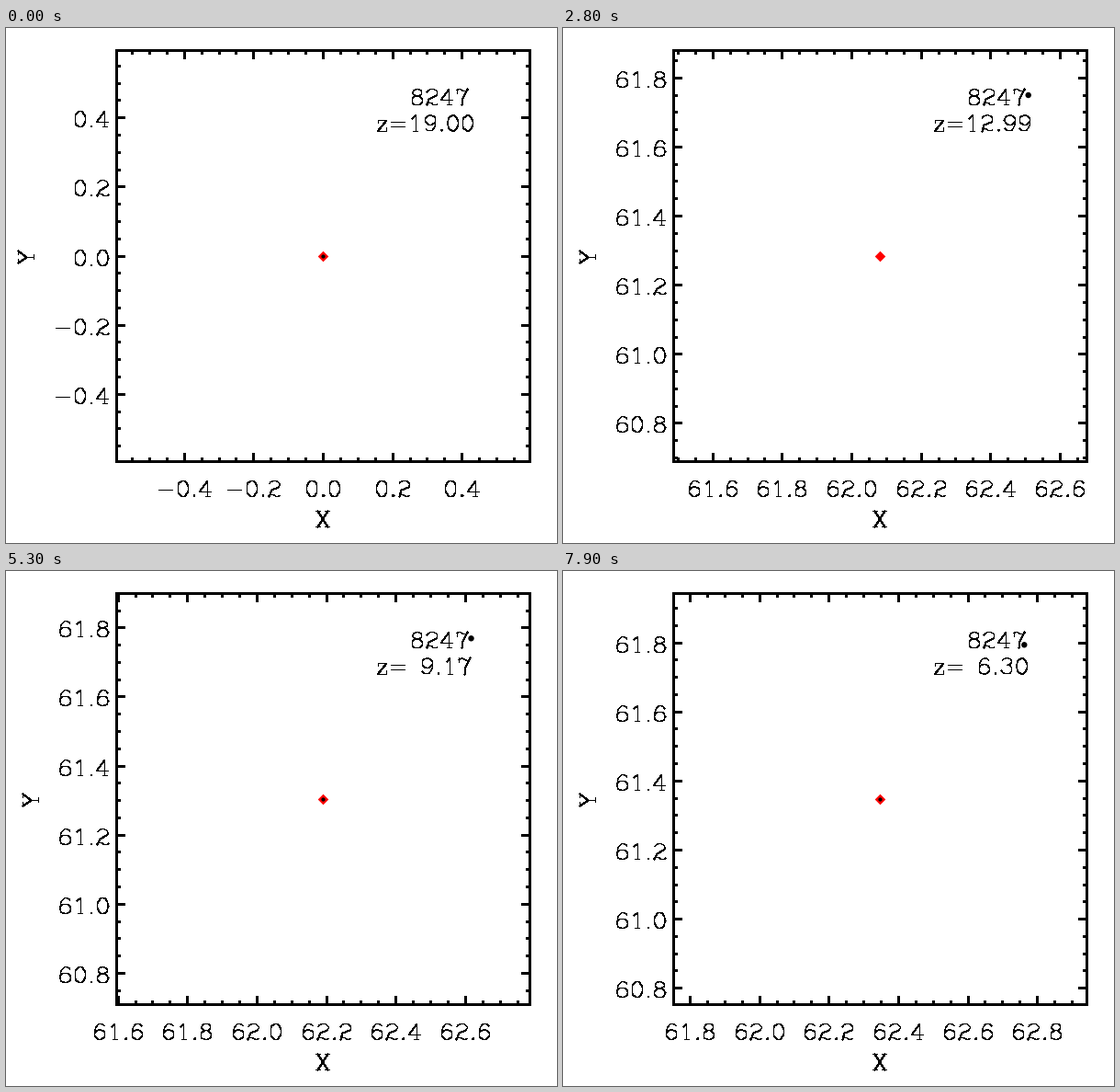
Write a matplotlib script that moves like this. It is 600x560 px and loops after 8 s.

```python
import numpy as np
import matplotlib.pyplot as plt
from matplotlib.animation import FuncAnimation
from matplotlib.collections import LineCollection
from matplotlib.patches import Circle, RegularPolygon

W, H, DPI = 600, 560, 100
PX = 72 / DPI
FRAMES, STEP = 80, 100

LEFT, RIGHT, TOP, BOTTOM = 120.5, 570.5, 24.5, 471.5
MX, MY = 345.5, 248.0
HALF = 0.595          # half the axis range
SX, SY = (RIGHT - LEFT) / (2 * HALF), (BOTTOM - TOP) / (2 * HALF)
UNIT = 0.815          # pixels per glyph unit
LABEL_END = 113.5

# ---- stroke lettering: 21 units high, y up ----
GLYPHS = {}


def glyph(char, width, *strokes):
    GLYPHS[char] = (width, strokes)


def line(*xy):
    return np.array(xy, float).reshape(-1, 2)


def arc(cx, cy, rx, ry, a=0, b=360):
    t = np.radians(np.linspace(a, b, 25))
    return np.column_stack([cx + rx * np.cos(t), cy + ry * np.sin(t)])


def serif(x, y=0):
    return line(x - 3, y, x + 3, y)


def wave(y, x0=3, x1=17):
    x = np.linspace(x0, x1, 15)
    return np.column_stack([x, y + 1.5 * np.sin(2 * np.pi * (x - x0) / (x1 - x0))])


glyph(" ", 16)
glyph("0", 20, arc(10, 10.5, 7, 10.5))
glyph("1", 20, line(6, 17, 10.5, 21, 10.5, 0), serif(10.5))
glyph("2", 20, arc(10, 15.5, 7, 5.5, 165, -40), line(15.4, 12, 6, 8, 3, 0),
      wave(1.5))
glyph("3", 20, arc(10, 16.5, 6.5, 4.5, 160, -90), arc(10, 6, 7, 6, 90, -160))
glyph("4", 20, line(13, 0, 13, 21, 2, 6, 18, 6), serif(13))
glyph("5", 20, line(15, 21, 5, 21, 4, 11), arc(10, 7, 7, 7, 145, -160))
glyph("6", 20, arc(10, 6.5, 7, 6.5), arc(11, 8, 8, 13, 50, 180))
glyph("7", 20, line(3, 15, 3, 21), wave(19.5), line(17, 21, 11, 9, 10, 0))
glyph("8", 20, arc(10, 16.5, 6, 4.5), arc(10, 6, 7, 6))
glyph("9", 20, *[(20, 21) - s for s in GLYPHS["6"][1]])
glyph(".", 10, arc(5, 1, 1, 1))
glyph("-", 26, line(4, 9, 22, 9))
glyph("=", 26, line(4, 12, 22, 12), line(4, 6, 22, 6))
glyph("z", 18, line(4, 10, 4, 14, 15, 14, 3, 0, 15, 0, 15, 4))
glyph("X", 20, line(3, 21, 17, 0), line(17, 21, 3, 0),
      *[serif(x, y) for x in (4, 16) for y in (0, 21)])
glyph("Y", 21, line(3, 21, 10.5, 10, 10.5, 0), line(18, 21, 10.5, 10),
      serif(4, 21), serif(17, 21), serif(10.5))


def width(text):
    return UNIT * sum(GLYPHS[c][0] for c in text)


def write(text, x, y, align=0.0, upright=False):
    """Strokes of text on pixel centres; (x, y) is on the baseline."""
    out, pen = [], -align * width(text)
    for c in text:
        adv, strokes = GLYPHS[c]
        for s in strokes:
            u, v = pen + UNIT * s[:, 0], UNIT * s[:, 1]
            px, py = (x - v, y - u) if upright else (x + u, y - v)
            out.append(np.floor(np.column_stack([px, py])) + 0.5)
        pen += UNIT * adv
    return out


# ---- motion: everything follows the scale factor a = 1 / (1 + z) ----
def redshift(n):
    return 20 * np.exp(-0.012757 * n) - 1


def center(n):
    if n == 0:
        return 0.0, 0.0
    a = 1 / (1 + redshift(n))
    d = a - 0.079
    return 61.7925 + 4.05 * a, 61.276 + 0.6 * (d + np.hypot(d, 0.02))


def companion(n):
    drift = (n / (FRAMES - 1)) ** 8
    return 506.7 + max(0, 27 - n) - 4.4 * drift, 73 + 7.3 * drift


def ticks(mid):
    first = int(np.ceil((mid - HALF) / 0.05))
    last = int(np.floor((mid + HALF) / 0.05))
    return [(k * 0.05, k % 4 == 0) for k in range(first, last + 1)]


# ---- stage ----
fig = plt.figure(figsize=(W / DPI, H / DPI), dpi=DPI, facecolor="white")
ax = fig.add_axes([0, 0, 1, 1])
ax.set_xlim(0, W)
ax.set_ylim(H, 0)
ax.axis("off")


def strokes(segments, weight, cap="butt"):
    lines = LineCollection(segments, colors="black", linewidths=weight * PX,
                           antialiaseds=False, capstyle=cap, joinstyle="round")
    lines.set_snap(False)
    return ax.add_collection(lines, autolim=False)


frame = [[(LEFT - 1.5, y), (RIGHT + 1.5, y)] for y in (TOP, BOTTOM)]
frame += [[(x, TOP), (x, BOTTOM)] for x in (LEFT, RIGHT)]
strokes(frame, 3)
marks = strokes([], 3)
letters = strokes([], 1, "projecting")
ax.add_patch(RegularPolygon((MX, MY + 0.5), 4, radius=5.8, orientation=np.pi / 4 * 0,
                            color="red", lw=0))
core = ax.add_patch(Circle((MX, MY + 0.5), 2.1, color="black", lw=0))
dot = ax.add_patch(Circle((0, 0), 3.2, color="black", lw=0))


def update(n):
    cx, cy = center(n)
    segs = []
    text = write("8247", 439.7, 83.7)
    text += write(f"z={redshift(n):5.2f}", 401.8, 112)
    text += write("X", MX - 0.5, 542.7, 0.5)

    for value, major in ticks(cx):
        x = np.floor(MX + (value - cx) * SX) + 0.5
        size = 9 if major else 4.5
        segs += [[(x, TOP), (x, TOP + size)], [(x, BOTTOM), (x, BOTTOM - size)]]
        if major:
            text += write(f"{value:.1f}", x, 509.5, 0.5)

    widest = 0
    for value, major in ticks(cy):
        y = np.floor(MY - (value - cy) * SY) + 0.5
        size = 9 if major else 4.5
        segs += [[(LEFT, y), (LEFT + size, y)], [(RIGHT, y), (RIGHT - size, y)]]
        if major:
            label = f"{value:.1f}"
            widest = max(widest, width(label))
            text += write(label, LABEL_END, y + 10.2, 1.0)
    text += write("Y", LABEL_END - widest - 21, MY + 1, 0.5, upright=True)

    marks.set_segments(segs)
    letters.set_segments(text)
    core.set_visible(n == 0 or n >= 35)
    dot.set_center(companion(n))
    dot.set_visible(n > 0)
    return marks, letters, core, dot


anim = FuncAnimation(fig, update, frames=FRAMES, init_func=lambda: update(0),
                     interval=STEP, repeat=True, repeat_delay=0, blit=False)
plt.show()
```
